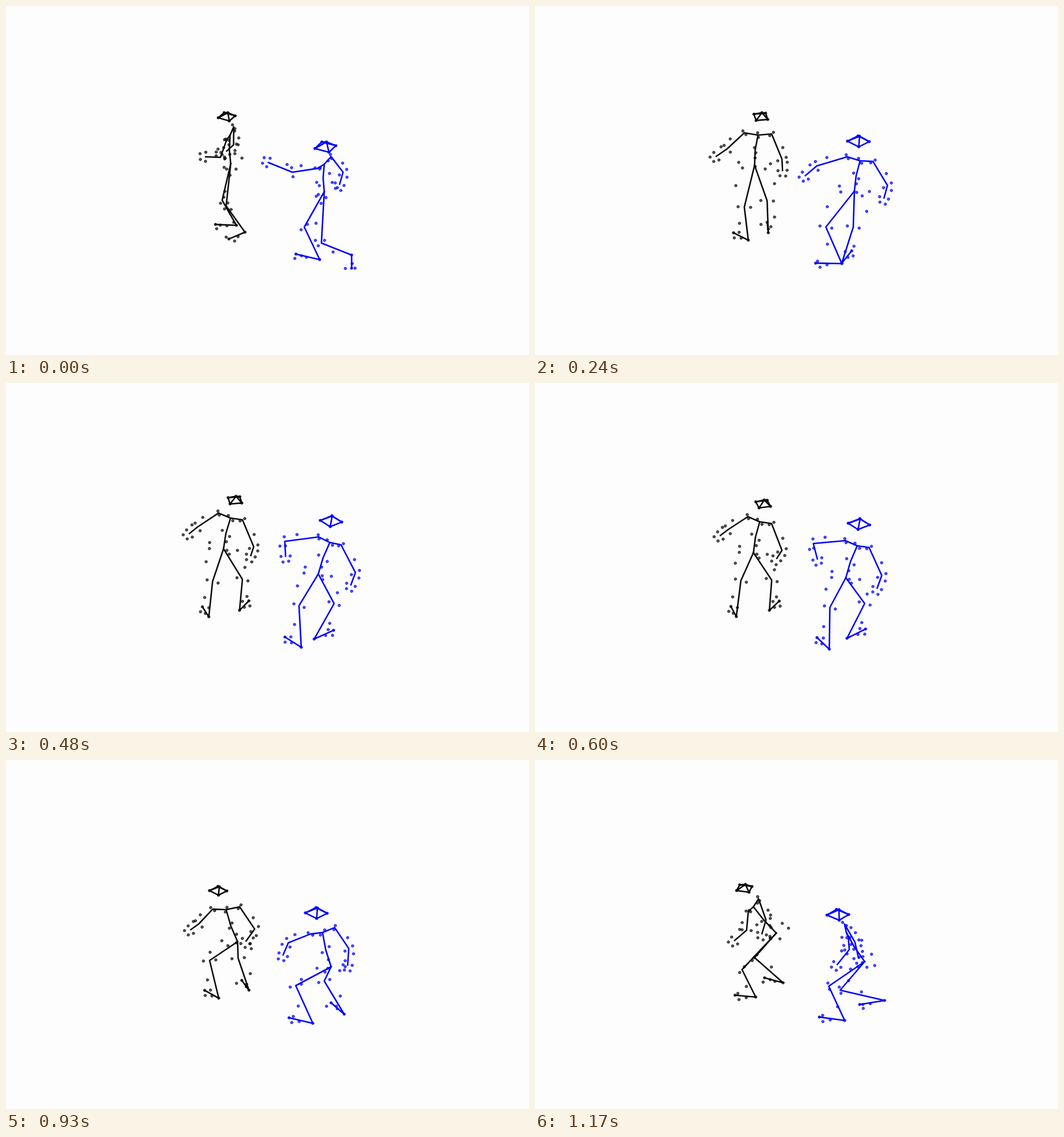
An HTML page with a canvas for the animation above (1200 ms loop, 917 by 611 pixels).

```html
<!DOCTYPE html>
<html lang="en">
<head>
<meta charset="utf-8">
<title>Two dancers, motion capture</title>
<style>
html, body { margin: 0; width: 100%; height: 100%; overflow: hidden; background: #fdfdfd; }
canvas { display: block; width: 917px; height: 611px; }
</style>
</head>
<body>
<canvas id="stage"></canvas>
<script>
const W = 917, H = 611, LOOP = 1200, STEP = 30;
const TILT = 0.5; // how much the raised camera shows of depth
const times = [0, 240, 600, 930, 1170];

// Key poses: x, y of the guiding joints and the yaw in degrees of the rigid parts.
// Yaw 0 faces away from the camera, 90 faces left.
const black = {
  ink: "#0a0a0a", scale: 0.8,
  joints: {
    head: [387,194, 396,194, 400,212, 372,229, 367,225],
    neck: [393,226, 391,226, 394,243, 386,262, 383,257],
    hip: [394,276, 385,279, 383,297, 406,318, 423,303],
    LE: [376,265, 337,250, 338,257, 338,287, 371,298],
    LW: [350,264, 318,263, 325,267, 324,297, 350,316],
    RE: [399,243, 433,268, 433,293, 436,296, 405,280],
    RW: [387,254, 434,288, 424,307, 421,317, 398,304],
    LK: [386,350, 367,352, 361,346, 357,351, 363,367],
    LA: [419,396, 374,410, 353,409, 373,417, 387,415],
    RK: [379,340, 407,341, 415,345, 407,347, 385,346],
    RA: [404,384, 409,397, 411,398, 426,403, 435,390]
  },
  yaw: {
    body: [75, -5, -30, 10, 68],
    head: [60, 10, 15, 45, 75],
    L: [130, 45, 15, 42, 80],
    R: [85, 3, -28, 20, 62]
  }
};
const blue = {
  ink: "#0000ff", scale: 1,
  joints: {
    head: [560,247, 567,237, 568,247, 544,268, 531,271],
    neck: [558,277, 570,271, 565,285, 555,302, 546,302],
    hip: [558,325, 560,324, 545,341, 570,362, 578,353],
    LE: [502,291, 494,280, 488,281, 495,320, 551,332],
    LW: [460,274, 474,297, 495,308, 486,341, 530,358],
    RE: [591,291, 618,314, 608,337, 601,330, 561,319],
    RW: [585,312, 612,336, 600,359, 599,359, 567,346],
    LK: [553,415, 510,387, 517,393, 508,395, 515,396],
    LA: [606,436, 538,451, 516,466, 538,461, 543,456],
    RK: [523,387, 558,387, 578,386, 558,387, 535,403],
    RA: [550,444, 538,450, 547,447, 593,445, 613,421]
  },
  yaw: {
    body: [60, -20, -30, 28, 98],
    head: [62, 45, 38, 45, 50],
    L: [180, 88, 28, 65, 75],
    R: [65, -22, -45, 30, 108]
  }
};

const bones = [
  "fl fr br bl fl", "fl top br", "fr top bl",
  "LW LE LS neck RS RE RW", "neck mid hip",
  "hip LK LA LT", "hip RK RA RT"
].map(s => s.split(" "));
const jointDots = ["fl", "fr", "br", "bl", "top", "LA", "LT", "RA", "RT"];

// Arm markers: bone, part of its length, px along it, px outward across it.
const armDots = [
  ["S E", .62, 0, 9], ["S E", 1, 0, 8], ["S E", 1, 0, -8], ["E W", .3, 0, 9],
  ["E W", 1, 0, 8], ["E W", 1, 0, -8], ["E W", 1, 10, 5], ["E W", 1, 9, -5]
];
// Other paired markers: bone, part of its length, outward, forward, down.
const sideDots = [
  ["S S", 0, 3, 3, -1.5], ["S S", 0, -3, -3, 1.5],
  ["hip hip", 0, 28, 0, -4], ["hip hip", 0, 20, -15, -2],
  ["hip K", .5, 24, 0, 0], ["K A", .5, 12, 0, 0],
  ["K K", 0, 11, 0, 0], ["K K", 0, -11, 0, 0],
  ["T T", 0, 6, -8, 4], ["T T", 0, 1, -20, 2], ["T T", 0, -11, -3, 2]
];
// Spine markers: joint, forward, down; mostly front and back pairs.
const spineDots = [
  ["neck", -8, -8], ["neck", 8, 8], ["mid", -13, -11], ["mid", 13, 11],
  ["hip", 10, -8], ["hip", 12, 8]
];

const canvas = document.getElementById("stage");
const ctx = canvas.getContext("2d");
const ratio = window.devicePixelRatio || 1;
canvas.width = W * ratio;
canvas.height = H * ratio;

// Smooth curve through unevenly spaced keys.
function curve(v, t) {
  const last = times.length - 1;
  let i = 0;
  while (i < last - 1 && t >= times[i + 1]) i++;
  const slope = k => {
    const a = Math.max(k - 1, 0), b = Math.min(k + 1, last);
    return (v[b] - v[a]) / (times[b] - times[a]);
  };
  const d = times[i + 1] - times[i], u = (t - times[i]) / d;
  const u2 = u * u, u3 = u2 * u;
  return v[i] * (2 * u3 - 3 * u2 + 1) + v[i + 1] * (3 * u2 - 2 * u3)
    + d * (slope(i) * (u3 - 2 * u2 + u) + slope(i + 1) * (u3 - u2));
}

const mix = (a, b, k) => [a[0] + (b[0] - a[0]) * k, a[1] + (b[1] - a[1]) * k];

// Moves from a point by a turned offset on the ground plane, then down.
function shift([x, y], yaw, right, forward, down = 0) {
  const c = Math.cos(yaw), s = Math.sin(yaw);
  return [x + right * c - forward * s, y - TILT * (right * s + forward * c) + down];
}

function pose({ joints, yaw, scale }, t) {
  const p = {}, turn = {};
  for (const name in joints) {
    p[name] = [0, 1].map(n => curve(joints[name].filter((_, i) => i % 2 === n), t));
  }
  for (const part in yaw) turn[part] = curve(yaw[part], t) * Math.PI / 180;

  const corner = (r, f) => shift(p.head, turn.head, 13 * r * scale, 14 * f * scale);
  p.fl = corner(-1, 1);
  p.fr = corner(1, 1);
  p.br = corner(1, -1);
  p.bl = corner(-1, -1);
  p.top = [p.head[0] + 2, p.head[1] - 9 * scale];

  const centre = mix(p.neck, p.hip, 0.5);
  p.mid = [centre[0] - 2, centre[1]];
  p.LS = shift(p.neck, turn.body, -24, 0, -3);
  p.RS = shift(p.neck, turn.body, 24, 0, -3);
  p.LT = shift(p.LA, turn.L, 0, 46 * scale);
  p.RT = shift(p.RA, turn.R, 0, 46 * scale);
  return { p, turn };
}

function markers({ p, turn }) {
  const out = jointDots.map(name => p[name]);
  for (const [name, forward, down] of spineDots) {
    out.push(shift(p[name], turn.body, 0, forward, down));
  }
  for (const side of ["L", "R"]) {
    const sign = side === "L" ? -1 : 1;
    const ends = bone => bone.split(" ").map(n => p[n] || p[side + n]);
    for (const [bone, k, along, across] of armDots) {
      const [a, b] = ends(bone), [x, y] = mix(a, b, k);
      const len = Math.hypot(b[0] - a[0], b[1] - a[1]) || 1;
      const dx = (b[0] - a[0]) / len, dy = (b[1] - a[1]) / len;
      const w = across * sign;
      out.push([x + dx * along + dy * w, y + dy * along - dx * w]);
    }
    for (const [bone, k, outward, forward, down] of sideDots) {
      const yaw = bone[0] === "T" ? turn[side] : turn.body;
      out.push(shift(mix(...ends(bone), k), yaw, outward * sign, forward, down));
    }
  }
  return out;
}

function drawFigure(fig, t) {
  const now = pose(fig, t);
  ctx.fillStyle = ctx.strokeStyle = fig.ink;

  ctx.globalAlpha = 0.7;
  ctx.lineWidth = 1;
  for (const [x, y] of markers(now)) {
    ctx.beginPath();
    ctx.arc(x, y, 2.3, 0, 2 * Math.PI);
    ctx.fill();
    ctx.stroke();
  }

  ctx.globalAlpha = 1;
  ctx.lineWidth = 2.6;
  ctx.lineJoin = "round";
  ctx.lineCap = "square";
  for (const chain of bones) {
    ctx.beginPath();
    for (const name of chain) ctx.lineTo(...now.p[name]);
    ctx.stroke();
  }
}

function frame() {
  const t = Math.floor(performance.now() % LOOP / STEP) * STEP;
  ctx.setTransform(ratio, 0, 0, ratio, 0, 0);
  ctx.fillStyle = "#fdfdfd";
  ctx.fillRect(0, 0, W, H);
  drawFigure(black, t);
  drawFigure(blue, t);
  requestAnimationFrame(frame);
}
frame();
</script>
</body>
</html>
```
